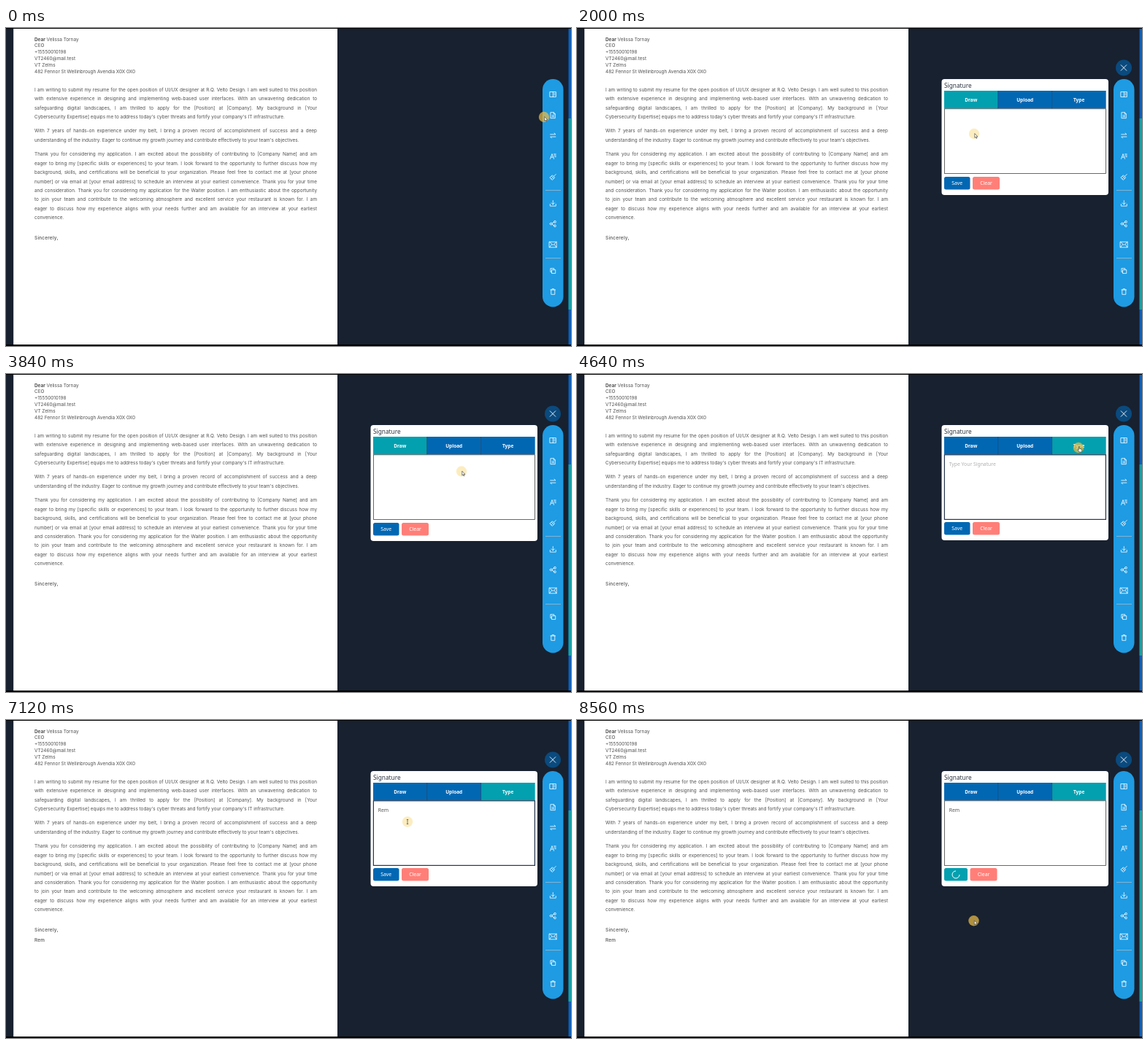
Write an HTML page that moves like this. It is 774 px wide and 436 px high and loops after 8640 ms.

```html
<!DOCTYPE html>
<html lang="en">
<head>
<meta charset="utf-8">
<title>Letter signature</title>
<style>
  html, body { margin: 0; width: 100%; height: 100%; overflow: hidden; background: #18212f; }
  #stage { position: absolute; left: 0; top: 0; width: 774px; height: 436px; overflow: hidden; }
  #letter div {
    position: absolute; left: 39px; width: 387px; height: 12px; line-height: 12px;
    font: 6.4px/12px Inter, "Open Sans", sans-serif; color: #505050; white-space: nowrap;
  }
  #letter .full { text-align: justify; text-align-last: justify; }
  #letter .close { font-weight: 500; letter-spacing: .25px; }
  svg { position: absolute; left: 0; top: 0; }
  svg text { font-family: "Noto Sans", "Open Sans", sans-serif; }
  .icon { fill: none; stroke: #fff; stroke-width: .9; stroke-linejoin: round; stroke-linecap: round; }
  .tab { font-size: 6.5px; font-weight: 600; fill: #fff; text-anchor: middle; }
  .button { font-size: 6.9px; font-weight: 500; fill: #fff; text-anchor: middle; }
</style>
</head>
<body>
<div id="stage">
  <svg width="774" height="436" viewBox="0 0 774 436">
    <rect x="10.2" y="1" width="443.8" height="433" fill="#fff"/>
  </svg>
  <div id="letter"></div>
  <svg width="774" height="436" viewBox="0 0 774 436">
    <path d="M0 0H774V1H0ZM0 434H774V436H0Z" fill="#000"/>
    <path d="M770.6 1H774V434H770.6Z" fill="#0b60bd"/>
    <path d="M770.6 124H774V386H770.6Z" fill="#12a3a6"/>
    <rect x="735" y="70" width="28.5" height="312.5" rx="14.2" fill="#1e9be3"/>
    <path d="M739 222.5H760M739 315.5H760" stroke="#a3b9cb" stroke-width=".8"/>
    <g id="icons" class="icon"></g>

    <g id="panel">
      <circle cx="749" cy="54.5" r="11" fill="#0a4a7e"/>
      <path class="icon" d="M745.2 50.7L752.8 58.3M752.8 50.7L745.2 58.3"/>
      <rect id="card" x="499.5" y="70" width="228.5" height="159" rx="4" fill="#fff"/>
      <text x="503" y="82.4" font-size="8.3" font-weight="500" fill="#2c3440">Signature</text>
      <g id="tabs"></g>
      <path d="M576.7 86V110.5M650.6 86V110.5" stroke="#12406b" stroke-width=".7"/>
      <rect id="area" x="503.4" y="110.8" width="221" height="88.6" fill="#fff"/>
      <text id="typed" x="509.7" y="125.8" font-size="6.8"></text>
      <rect id="caret" y="119" width=".8" height="8" fill="#222"/>
      <g id="buttons">
        <rect id="save" x="503" y="204" height="17.5" rx="2.5"/>
        <text id="saveLabel" class="button" x="520.7" y="215.3">Save</text>
        <path id="spinner" d="M519 208A5 5 0 1 0 524 213" fill="none" stroke="#fff" stroke-width="1"/>
        <g id="clear">
          <rect x="542" y="204" width="37" height="17.5" rx="2.5" fill="#ff7f78"/>
          <text class="button" x="560.5" y="215.3">Clear</text>
        </g>
      </g>
    </g>

    <g id="flyout">
      <rect id="flyoutBack" y="109.5" height="20.5" rx="10" fill="#1e9be3"/>
      <g id="flyoutBody">
        <path id="docIcon" class="icon" transform="scale(.9)"/>
        <text id="flyoutLabel" x="8.7" y="2.5" font-size="6.9" fill="#fff">Signature</text>
      </g>
    </g>

    <g id="cursor">
      <circle id="ring" r="7.2"/>
      <path id="pointer" stroke-linejoin="round"/>
    </g>
  </svg>
</div>
<script>
const LOOP = 8640, STEP = 80;
const $ = id => document.getElementById(id);
const set = (id, attrs) => { for (const k in attrs) $(id).setAttribute(k, attrs[k]); };
const show = (id, on) => set(id, { visibility: on ? 'visible' : 'hidden' });
const clamp = x => Math.min(1, Math.max(0, x));
const ease = x => x * x * (3 - 2 * x);

// Letter
const header = ['<b>Dear</b> Velissa Tornay', 'CEO', '+15550010198', 'VT2460@mail.test', 'VT Zelms',
  '482 Fennor St Wellinbrough Avendia X0X 0X0'];
const paragraphs = [
  [84, `I am writing to submit my resume for the open position of UI/UX designer at R.Q. Velto Design. I am well suited to this position
with extensive experience in designing and implementing web-based user interfaces. With an unwavering dedication to
safeguarding digital landscapes, I am thrilled to apply for the [Position] at [Company]. My background in [Your
Cybersecurity Expertise] equips me to address today's cyber threats and fortify your company's IT infrastructure.`],
  [140.7, `With 7 years of hands-on experience under my belt, I bring a proven record of accomplishment of success and a deep
understanding of the industry. Eager to continue my growth journey and contribute effectively to your team's objectives.`],
  [172.6, `Thank you for considering my application. I am excited about the possibility of contributing to [Company Name] and am
eager to bring my [specific skills or experiences] to your team. I look forward to the opportunity to further discuss how my
background, skills, and certifications will be beneficial to your organization. Please feel free to contact me at [your phone
number] or via email at [your email address] to schedule an interview at your earliest convenience. Thank you for your time
and consideration. Thank you for considering my application for the Waiter position. I am enthusiastic about the opportunity
to join your team and contribute to the welcoming atmosphere and excellent service your restaurant is known for. I am
eager to discuss how my experience aligns with your needs further and am available for an interview at your earliest
convenience.`]
];
function addLine(html, y, cls = '') {
  const div = document.createElement('div');
  div.innerHTML = html;
  div.className = cls;
  div.style.top = y - 5.3 + 'px';
  $('letter').append(div);
  return div;
}
header.forEach((s, i) => addLine(s, 14.8 + i * 8.86));
for (const [top, text] of paragraphs)
  text.split('\n').forEach((s, i, all) => addLine(s, top + i * 12.4, i < all.length - 1 ? 'full' : ''));
addLine('Sincerely,', 287.4, 'close');
const signed = addLine('', 301.4, 'close');

// Side bar
const icons = [
  [91, 'M-4.5 -3.8H4.5V3.8H-4.5ZM0 -3.8V3.8M1.6 -1.4H3M1.6 .8H3'],
  [147.5, 'M-4 -1.8H4L2 -3.8M4 1.8H-4L-2 3.8'],
  [176, 'M-4.2 3.8L-1.4 -3.8L1.4 3.8M-3.2 1.2H.4M1.4 -3.4H4.4M2 -1.4H4.4M2.6 .6H4.4'],
  [204.5, 'M4.4 -4.4L1 -1M-.6 -2.6L2.6 .6L-1 4.4L-4.6 1ZM-2 -1.2L1.2 2M-2.8 2.6L-1.6 1.4'],
  [240.5, 'M0 -4.4V1.4M-2.4 -.8L0 1.6L2.4 -.8M-4.4 1V4H4.4V1'],
  [268.5, 'M-1.6 -.8L1.6 -2.4M-1.6 .8L1.6 2.4M-4.6 0a1.6 1.6 0 1 0 3.2 0a1.6 1.6 0 1 0 -3.2 0M1.4 -3.1a1.6 1.6 0 1 0 3.2 0a1.6 1.6 0 1 0 -3.2 0M1.4 3.1a1.6 1.6 0 1 0 3.2 0a1.6 1.6 0 1 0 -3.2 0'],
  [297, 'M-5.4 -4.2H5.4V4.2H-5.4ZL0 .8L5.4 -4.2M-5.4 4.2L-1.6 -.6M5.4 4.2L1.6 -.6'],
  [333, 'M-1.6 -1.6H3.8V3.8H-1.6ZM-1.8 1.6H-3.8V-3.8H1.6V-1.8'],
  [361.5, 'M-3.6 -2.8H3.6M-1.4 -2.8V-4.2H1.4V-2.8M-2.8 -2.8V4.2H2.8V-2.8']
];
$('icons').innerHTML = icons.map(([y, d]) =>
  `<path transform="translate(749.3 ${y}) scale(.9)" d="${d}"/>`).join('');
set('docIcon', { d: 'M-3.3 -4.4H1L3.3 -2.1V4.4H-3.3ZM1 -4.4V-2.1H3.3M-1.5 .2H1.5M-1.5 2.2H1.5' });

// Panel
$('tabs').innerHTML = ['Draw', 'Upload', 'Type'].map((name, i) => {
  const x = 503 + i * 73.9;
  return `<rect id="tab${name}" x="${x}" y="86" width="73.9" height="24.5"/>
    <text class="tab" x="${x + 36.8}" y="100.8">${name}</text>`;
}).join('');

// Cursor: [time, x, y]
const track = [
  [0, 737, 122], [80, 736, 122], [400, 722, 121], [640, 713, 121.5], [1040, 713, 121.5],
  [1360, 660, 128], [1840, 546, 145], [2000, 544, 145], [2160, 545, 147], [2400, 551, 155],
  [2560, 565, 153], [2720, 575, 138], [2880, 561, 151], [3120, 594, 165], [3280, 598, 154],
  [3400, 606, 159], [3600, 615, 155], [3840, 624, 133.5], [4320, 687, 101], [4640, 687, 101],
  [5120, 550, 140], [7280, 550, 139.5], [7840, 519, 211], [8160, 519, 212], [8480, 543.5, 275], [8640, 543.5, 275.5]
];
const pointers = {
  arrow: { d: 'M.8 -.4V5.4L2.1 4.3L3.1 6.4L4 6L3 4H4.9Z', fill: '#fff', stroke: '#333', 'stroke-width': .6 },
  hand: { d: 'M.6 5.8L-.8 2.8L.4 2.6V-1.4H1.6V1.4L4.6 2.2V4.4L3.8 6.2Z', fill: '#fff', stroke: '#333', 'stroke-width': .6 },
  beam: { d: 'M-1.2 -3H1.2M0 -3V3M-1.2 3H1.2', fill: 'none', stroke: '#444', 'stroke-width': .7 }
};
function cursorAt(t) {
  const i = track.findIndex((k, n) => n && t <= k[0]);
  const [t0, x0, y0] = track[i - 1], [t1, x1, y1] = track[i];
  const p = (t - t0) / (t1 - t0);
  return [x0 + (x1 - x0) * p, y0 + (y1 - y0) * p];
}
function pointerAt(t, x, y) {
  if (t >= 80 && t < 1280 || y > 203 && y < 222 || y < 110) return 'hand';
  return t >= 4800 && y < 200 ? 'beam' : 'arrow';
}

const keys = [[6000, 'R'], [6560, 'Re'], [6640, 'Rem']];
const carets = [[5360, 5840], [6000, 6480], [6560, 7120], [7600, 8080]];

function render(t) {
  const open = t >= 960, typing = t >= 4560, saving = t >= 8160;
  const teal = '#03a0b0', blue = '#0267b3';
  show('panel', open);

  for (const name of ['Draw', 'Upload', 'Type'])
    set('tab' + name, { fill: name === (typing ? 'Type' : 'Draw') ? teal : blue });
  set('card', { height: typing ? 158 : 159 });
  const focused = typing && !saving;
  set('area', { stroke: focused ? '#26364f' : '#444', 'stroke-width': focused ? 1.2 : .8 });

  const text = keys.reduce((s, [at, value]) => t >= at ? value : s, '');
  $('typed').textContent = text || (typing ? 'Type Your Signature' : '');
  set('typed', { fill: text ? '#555' : '#b0b0b0' });
  signed.textContent = text;
  set('caret', { x: 509.7 + (text ? $('typed').getComputedTextLength() : 0) });
  $('caret').style.display = carets.some(([a, b]) => t >= a && t < b) ? '' : 'none';

  set('buttons', { transform: `translate(0 ${typing ? -1 : 0})` });
  set('save', { width: saving ? 32 : 35.5, fill: saving ? teal : blue });
  set('clear', { transform: `translate(${saving ? -3.5 : 0} 0)` });
  $('saveLabel').style.display = saving ? 'none' : '';
  $('spinner').style.display = saving ? '' : 'none';
  set('spinner', { transform: `rotate(${(t - 8560) * .48} 519 213)` });

  const out = ease(clamp((t - 80) / 320)) - ease(clamp((t - 1280) / 320));
  const left = 738 - 66.5 * out;
  set('flyoutBack', { x: left, width: 758 - left });
  set('flyoutBody', { transform: `translate(${749.3 - 69 * out} 119.7)` });
  set('flyoutLabel', { opacity: out });

  const [x, y] = cursorAt(t);
  const onWhite = open && x > 500 && x < 727 && y > 110 && y < 200 && t >= 1200;
  set('cursor', { transform: `translate(${x} ${y})` });
  set('ring', { fill: onWhite ? 'rgba(249,220,130,.5)' : 'rgba(236,188,70,.72)' });
  set('pointer', pointers[pointerAt(t, x, y)]);
}

const start = performance.now();
function tick() {
  const t = (performance.now() - start) % LOOP;
  render(Math.floor(t / STEP) * STEP);
  requestAnimationFrame(tick);
}
tick();
</script>
</body>
</html>
```
